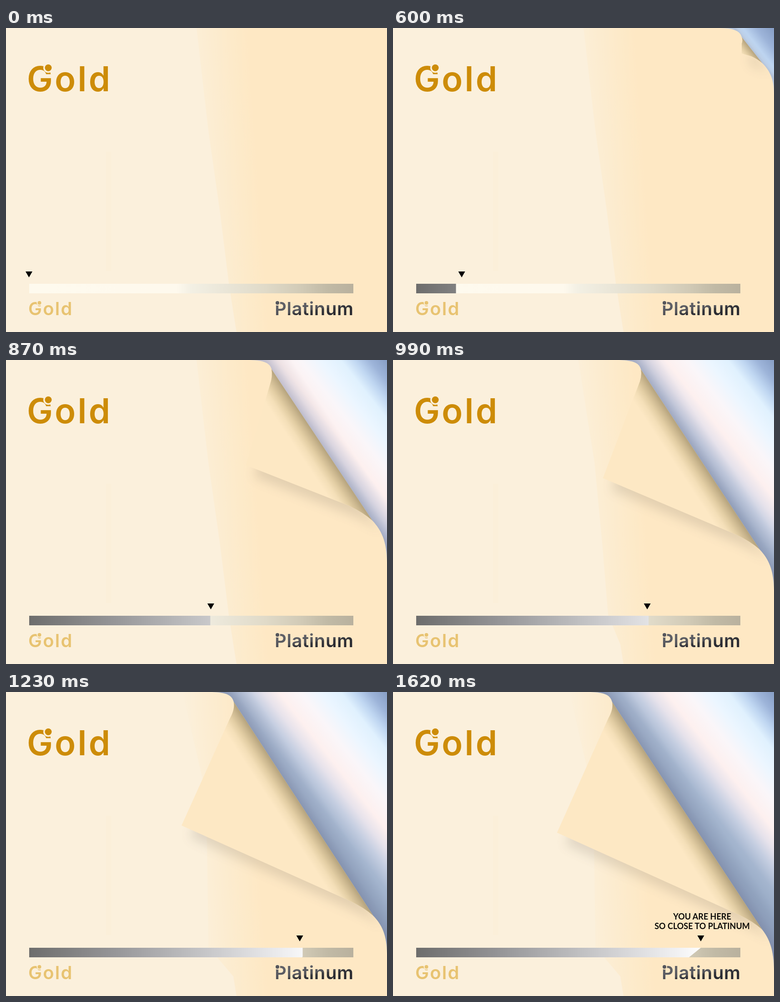
These frames come from a looping animation (838x668 px, 1800 ms). An HTML page with a canvas:

```html
<!DOCTYPE html>
<html lang="en">
<head>
<meta charset="utf-8">
<title>Gold to Platinum</title>
<style>
html, body { margin: 0; width: 100%; height: 100%; overflow: hidden; background: #fbf0dc; }
canvas, svg { position: absolute; left: 0; top: 0; width: 838px; height: 668px; display: block; }
.mark { font: 600 76px Inter, sans-serif; letter-spacing: .055em; }
.label { font: 700 18px Lato, sans-serif; text-anchor: middle; }
</style>
</head>
<body>
<canvas id="stage" width="838" height="668"></canvas>
<svg viewBox="0 0 838 668">
  <defs>
    <linearGradient id="steel" gradientUnits="userSpaceOnUse" x1="670" y1="602" x2="675" y2="634">
      <stop offset="0" stop-color="#606167"/>
      <stop offset=".5" stop-color="#515258"/>
      <stop offset=".62" stop-color="#34353b"/>
      <stop offset="1" stop-color="#292a30"/>
    </linearGradient>
  </defs>
  <g fill="#cd8c08">
    <text class="mark" x="46" y="139">Gold</text>
    <circle cx="93" cy="87.5" r="7.5" stroke="#fbf0dc" stroke-width="7" paint-order="stroke"/>
  </g>
  <g fill="#e8c371">
    <text class="mark" style="font-size:40px" x="49" y="631">Gold</text>
    <circle cx="73.5" cy="604" r="4" stroke="#fbf0dc" stroke-width="4" paint-order="stroke"/>
  </g>
  <g fill="url(#steel)">
    <text class="mark" style="font-size:40px;letter-spacing:.015em" x="591" y="631">Platinum</text>
    <circle cx="597" cy="604" r="4" fill="#55565c" stroke="#fee9c5" stroke-width="4" paint-order="stroke"/>
  </g>
  <g id="label" class="label" fill="#0b0a08" opacity="0">
    <text x="680" y="500">YOU ARE HERE</text>
    <text x="680" y="521">SO CLOSE TO PLATINUM</text>
  </g>
</svg>
<script>
const W = 838, H = 668, LOOP = 1800, MOVE = 1620, STEP = 30;
const ctx = document.getElementById('stage').getContext('2d');
const label = document.getElementById('label');

// time, fold top x y, flap corner x y, fold bottom x y, right edge y
const CURL = [
  [450, 838, 0, 838, 0, 838, 0, 0],
  [600, 767, 20, 767, 56, 812, 77, 145],
  [720, 668, 20, 650, 154, 811, 225, 297],
  [870, 584, 20, 528, 231, 806, 353, 445],
  [1110, 518, 21, 413, 278, 808, 463, 548],
  [1350, 491, 22, 373, 303, 808, 508, 592],
  [1620, 482, 22, 361, 309, 812, 522, 612]
];

const clamp = v => Math.max(0, Math.min(1, v));
const mix = (a, b, k) => a + (b - a) * k;

// cubic-bezier(.75, 0, .25, 1)
function ease(x) {
  let lo = 0, hi = 1;
  for (let i = 0; i < 24; i++) {
    const s = (lo + hi) / 2, r = 1 - s;
    if (2.25 * r * r * s + 0.75 * r * s * s + s * s * s < x) lo = s; else hi = s;
  }
  return lo * lo * (3 - 2 * lo);
}

// Smooth interpolation between the poses, at rest on both ends
function curlAt(t) {
  const last = CURL.length - 1;
  if (t >= MOVE) return CURL[last].slice(1);
  let i = 0;
  while (CURL[i + 1][0] <= t) i++;
  const a = CURL[i], b = CURL[i + 1], d = b[0] - a[0], k = (t - a[0]) / d;
  const slope = (n, c) => n === 0 || n === last ? 0 :
    (CURL[n + 1][c] - CURL[n - 1][c]) / (CURL[n + 1][0] - CURL[n - 1][0]);
  const k2 = k * k, k3 = k2 * k;
  return a.slice(1).map((v, n) => {
    const c = n + 1;
    return (2 * k3 - 3 * k2 + 1) * v + (3 * k2 - 2 * k3) * b[c] +
      d * ((k3 - 2 * k2 + k) * slope(i, c) + (k3 - k2) * slope(i + 1, c));
  });
}

function gradient(x1, y1, x2, y2, stops) {
  const g = ctx.createLinearGradient(x1, y1, x2, y2);
  for (const [at, color] of stops) g.addColorStop(at, color);
  return g;
}

const along = (len, stops) => stops.map(([d, c]) => [d / len, c]);

const warm = gradient(385, 0, 532, -10, [
  [0, '#fbf0dc'], [0.25, '#fceed5'], [0.45, '#fcecd0'], [0.75, '#fdeac9'], [1, '#fee8c4']]);
const track = gradient(51, 0, 764, 0, along(713, [
  [0, '#fefaee'], [325, '#fef9ed'], [355, '#f3f0e4'], [430, '#eae6d8'],
  [520, '#e0dac8'], [600, '#d1cab6'], [655, '#c1baa6'], [713, '#b9b19e']]));
const metal = gradient(51, 0, 671, 0, [
  [0, '#6d6d6c'], [0.29, '#949496'], [0.64, '#c8c8ca'], [0.92, '#f0f0f2'], [1, '#fcfcfc']]);
const platinum = gradient(W, 0, W - 0.786 * 400, 0.618 * 400, along(400, [
  [0, '#869dc4'], [30, '#9db4d9'], [55, '#bfd6f1'], [80, '#e0f1fe'], [115, '#ecf6ff'],
  [150, '#faf6f9'], [188, '#fdf0ef'], [215, '#e6e2eb'], [240, '#c5cee1'],
  [270, '#a5b6cf'], [310, '#95a8c3'], [400, '#8799b8']]));

function poly(points, fill) {
  ctx.beginPath();
  for (const [x, y] of points) ctx.lineTo(x, y);
  ctx.closePath();
  ctx.fillStyle = fill;
  ctx.fill();
}

function drawPage(t) {
  ctx.fillStyle = '#fbf0dc';
  ctx.fillRect(0, 0, W, H);
  ctx.fillStyle = '#fbefd9';
  ctx.fillRect(220, 272, 12, 262);
  const k = clamp((t - 900) / 240);
  poly([[mix(419, 388, k), 0], [mix(445, 440, k), 225], [mix(470, 443, k), 400],
    [mix(490, 445, k), 560], [500, 625], [507, H], [W, H], [W, 0]], warm);
}

function drawCurl(t) {
  if (t <= CURL[0][0]) return;
  const [bx, by, cx, cy, dx, dy, ey] = curlAt(t);
  const size = clamp(ey / 145);
  const len = Math.hypot(dx - bx, dy - by) || 1;
  const nx = (dy - by) / len, ny = (bx - dx) / len;

  const flap = new Path2D();
  const reach = Math.min(1, (dx - cx) / 100);
  flap.moveTo(bx, by);
  const hx = bx - (bx - cx) * 0.07, hy = by + Math.min(36, (cy - by) * 0.4);
  flap.quadraticCurveTo(bx + 3 * size, by + (hy - by) * 0.45, hx, hy);
  flap.lineTo(cx, cy);
  flap.lineTo(dx - 52 * reach, dy - 33 * reach);
  flap.quadraticCurveTo(dx - 20 * reach, dy - 18 * reach, dx, dy);
  flap.closePath();

  ctx.save();
  ctx.shadowColor = 'rgba(112,102,92,.19)';
  ctx.shadowBlur = 24;
  ctx.shadowOffsetX = 18 * size;
  ctx.shadowOffsetY = 26 * size;
  ctx.fillStyle = '#fde8c4';
  ctx.fill(flap);
  ctx.restore();

  const hole = new Path2D();
  hole.moveTo(bx - 54 * size, 0);
  hole.bezierCurveTo(bx - 20 * size, 0, bx - 4 * size, 5 * size, bx, by);
  hole.lineTo(dx, dy);
  hole.bezierCurveTo(dx + (W - dx) * 0.6, dy + (ey - dy) * 0.22, W, mix(dy, ey, 0.5), W, ey);
  hole.lineTo(W, 0);
  hole.closePath();
  ctx.fillStyle = platinum;
  ctx.fill(hole);
  const depth = 48 * Math.min(1, len / 240);
  ctx.fillStyle = gradient(bx, by, bx + nx * depth, by + ny * depth, [
    [0, 'rgba(92,92,125,.26)'], [0.4, 'rgba(92,92,125,.11)'], [1, 'rgba(92,92,125,0)']]);
  ctx.fill(hole);

  const wide = 52 * Math.min(1, 0.4 + len / 400);
  ctx.fillStyle = gradient(bx, by, bx - nx * wide, by - ny * wide, [
    [0, '#b5a37d'], [0.2, '#cbb78f'], [0.45, '#e3cea4'], [0.7, '#f4dfb8'], [1, '#fde8c4']]);
  ctx.fill(flap);
}

function drawBar(p) {
  ctx.fillStyle = track;
  ctx.fillRect(51, 562, 713, 21);
  const edge = 34.1 + 650.5 * p;
  if (edge > 51) {
    ctx.save();
    ctx.beginPath();
    ctx.rect(51, 562, edge - 51, 21);
    ctx.clip();
    poly([[51, 562], [677, 562], [651, 583], [51, 583]], metal);
    ctx.restore();
  }
  const x = 50.5 + 626.5 * p;
  poly([[x - 7.5, 535], [x + 7.5, 535], [x, 548]], '#000');
}

function draw(t) {
  drawPage(t);
  drawCurl(t);
  drawBar(ease(Math.min(1, t / MOVE)));
  label.setAttribute('opacity', clamp((t - 1380) / 180));
}

const start = performance.now();
function tick() {
  const t = (performance.now() - start) % LOOP;
  draw(Math.floor(t / STEP) * STEP);
  requestAnimationFrame(tick);
}
tick();
</script>
</body>
</html>
```
